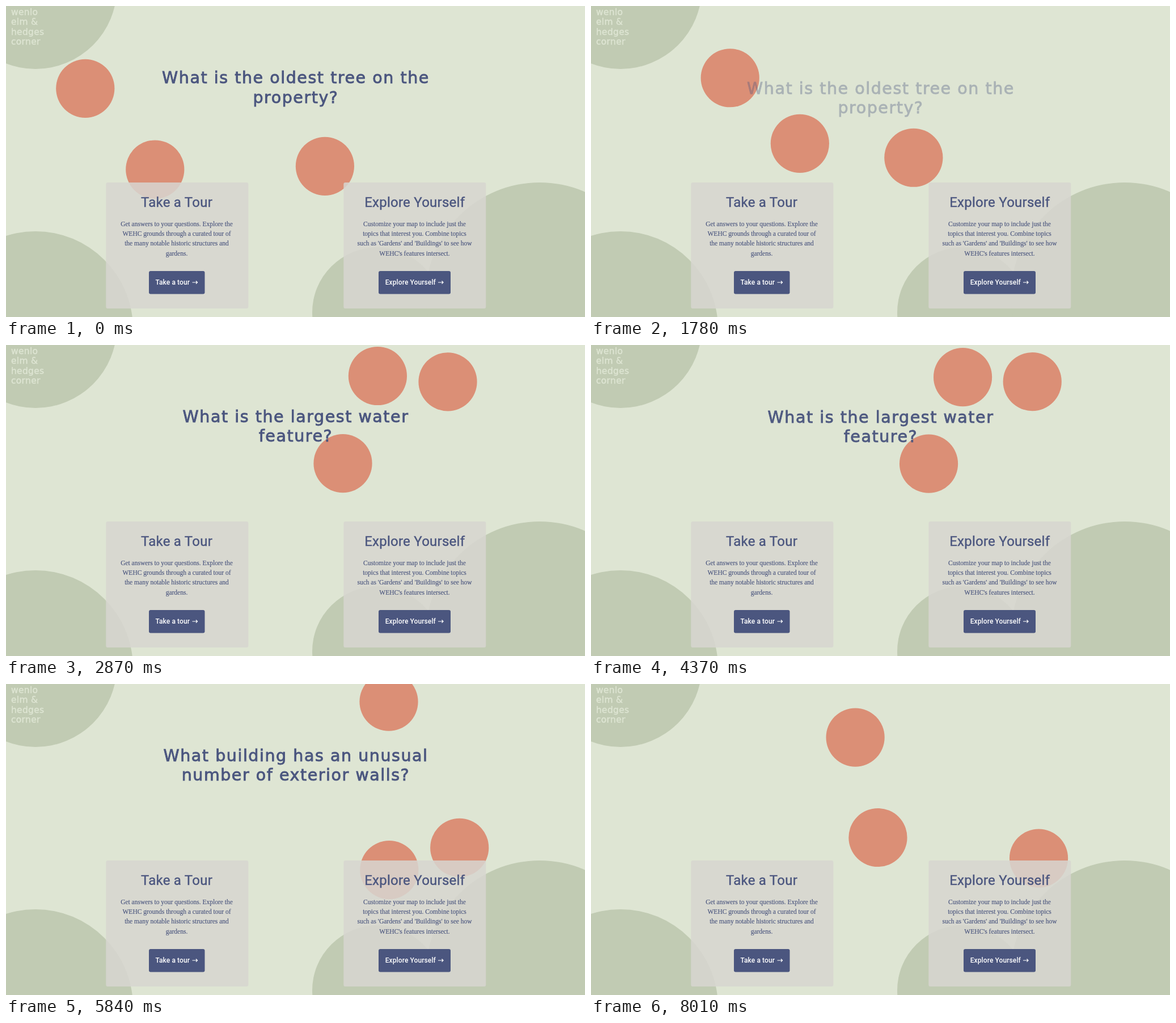
These frames come from a looping animation (1021 by 548 pixels, 8110 ms). An HTML page:

```html
<!DOCTYPE html>
<html lang="en">
<head>
<meta charset="utf-8">
<title>Garden questions</title>
<style>
  html, body { margin: 0; width: 100%; height: 100%; overflow: hidden; background: #dee5d3; }
  svg { display: block; width: 100vw; height: 100vh; }
  text { fill: #4b567f; stroke: #4b567f; stroke-width: 0; }
  .hill { fill: #c1cbb3; }
  .dot { fill: #db8f76; }
  .card { fill: #d7d6d0; fill-opacity: .85; }
  .button { fill: #4b567f; }
  .logo text { font: 15.5px "DejaVu Sans", sans-serif; letter-spacing: .3px; fill: #dee5d3; stroke: #dee5d3; stroke-width: .4px; }
  .title text { font: 28.5px "DejaVu Sans", sans-serif; letter-spacing: 1.55px; stroke-width: .9px; text-anchor: middle; }
  .head { font: 24px Roboto, sans-serif; letter-spacing: .25px; stroke-width: .4px; text-anchor: middle; }
  .body { font: 11.5px "Liberation Serif", serif; stroke-width: .15px; text-anchor: middle; }
  .label { font: 500 12px Roboto, sans-serif; letter-spacing: .1px; fill: #fff; }
  .arrow { fill: none; stroke: #fff; stroke-width: 1.2; }
</style>
</head>
<body>
<svg viewBox="0 0 1021 548">
  <g class="hill">
    <circle cx="52" cy="-32.5" r="143.5"/>
    <circle cx="52" cy="569" r="172"/>
    <circle cx="654.7" cy="540" r="114.7"/>
    <circle cx="941" cy="511.7" r="200.7"/>
  </g>
  <g class="logo">
    <text x="9" y="16">wenlo</text>
    <text x="9" y="33">elm &amp;</text>
    <text x="9" y="50.5">hedges</text>
    <text x="9" y="68">corner</text>
  </g>
  <circle class="dot" r="51.6"/>
  <circle class="dot" r="51.6"/>
  <circle class="dot" r="51.6"/>

  <g class="title">
    <text x="511" y="136">What is the oldest tree on the</text>
    <text x="511" y="170.5">property?</text>
  </g>
  <g class="title">
    <text x="511" y="136">What is the largest water</text>
    <text x="511" y="170.5">feature?</text>
  </g>
  <g class="title">
    <text x="511" y="136">What building has an unusual</text>
    <text x="511" y="170.5">number of exterior walls?</text>
  </g>

  <rect class="card" x="176.3" y="311" width="251" height="222" rx="3"/>
  <text class="head" x="301" y="354">Take a Tour</text>
  <text class="body" x="301" y="388">Get answers to your questions. Explore the</text>
  <text class="body" x="301" y="405">WEHC grounds through a curated tour of</text>
  <text class="body" x="301" y="422">the many notable historic structures and</text>
  <text class="body" x="301" y="439.5">gardens.</text>
  <rect class="button" x="252" y="467" width="98.5" height="40.4" rx="3"/>
  <text class="label" x="263.5" y="491">Take a tour</text>
  <path class="arrow" d="M328.5 487h9m-2.5-2.5l2.5 2.5l-2.5 2.5"/>

  <rect class="card" x="595.3" y="311" width="251" height="222" rx="3"/>
  <text class="head" x="720.7" y="354">Explore Yourself</text>
  <text class="body" x="720.5" y="388">Customize your map to include just the</text>
  <text class="body" x="720.5" y="405">topics that interest you. Combine topics</text>
  <text class="body" x="720.5" y="422">such as 'Gardens' and 'Buildings' to see how</text>
  <text class="body" x="720.5" y="439.5">WEHC's features intersect.</text>
  <rect class="button" x="657" y="467" width="127" height="40.4" rx="3"/>
  <text class="label" x="668.7" y="491">Explore Yourself</text>
  <path class="arrow" d="M762 487h9m-2.5-2.5l2.5 2.5l-2.5 2.5"/>
</svg>
<script>
  const LOOP = 8110, GLIDE = 1540, FADE = 770, ENTER_DELAY = 800, DROP = 28.7;
  const starts = [1320, 4285, 7250];

  // The picture updates in uneven ticks.
  const ticks = [0, 1340, 1550, 1670, 1780, 1930, 2050, 2160, 2280, 2400, 2510, 2630, 2750, 2870,
    4370, 4520, 4640, 4750, 4870, 4990, 5100, 5220, 5340, 5480, 5600, 5720, 5840,
    7340, 7490, 7630, 7780, 8010];

  // Resting places of each dot, one per question.
  const paths = [
    [[139.8, 145.3], [655.4, 54.5], [675.8, 327.6], [329, 211]],
    [[262.8, 288], [779, 64.8], [675, 31.2], [248.5, 159.6]],
    [[562.4, 282.3], [594, 208.6], [799.7, 288.4], [778.9, 326.6]]
  ];

  const dots = document.querySelectorAll(".dot");
  const titles = document.querySelectorAll(".title");

  const ease = (t, start, length) => {
    const p = Math.min(1, Math.max(0, (t - start) / length));
    return (1 - Math.cos(Math.PI * p)) / 2;
  };

  function draw(t) {
    const shifts = starts.map(s => ease(t, s, GLIDE));
    dots.forEach((dot, i) => {
      const [x, y] = [0, 1].map(axis => shifts.reduce(
        (sum, f, k) => sum + f * (paths[i][k + 1][axis] - paths[i][k][axis]), paths[i][0][axis]));
      dot.setAttribute("cx", x);
      dot.setAttribute("cy", y);
    });
    titles.forEach((title, i) => {
      const shown = i ? ease(t, starts[i - 1] + ENTER_DELAY, FADE) : 1;
      const gone = ease(t, starts[i], FADE);
      title.setAttribute("opacity", shown * (1 - gone));
      title.setAttribute("transform", `translate(0 ${DROP * (gone + shown - 1)})`);
    });
  }

  const begin = performance.now();
  function loop() {
    const now = (performance.now() - begin) % LOOP;
    draw(ticks.findLast(tick => tick <= now));
    requestAnimationFrame(loop);
  }
  draw(0);
  requestAnimationFrame(loop);
</script>
</body>
</html>
```
